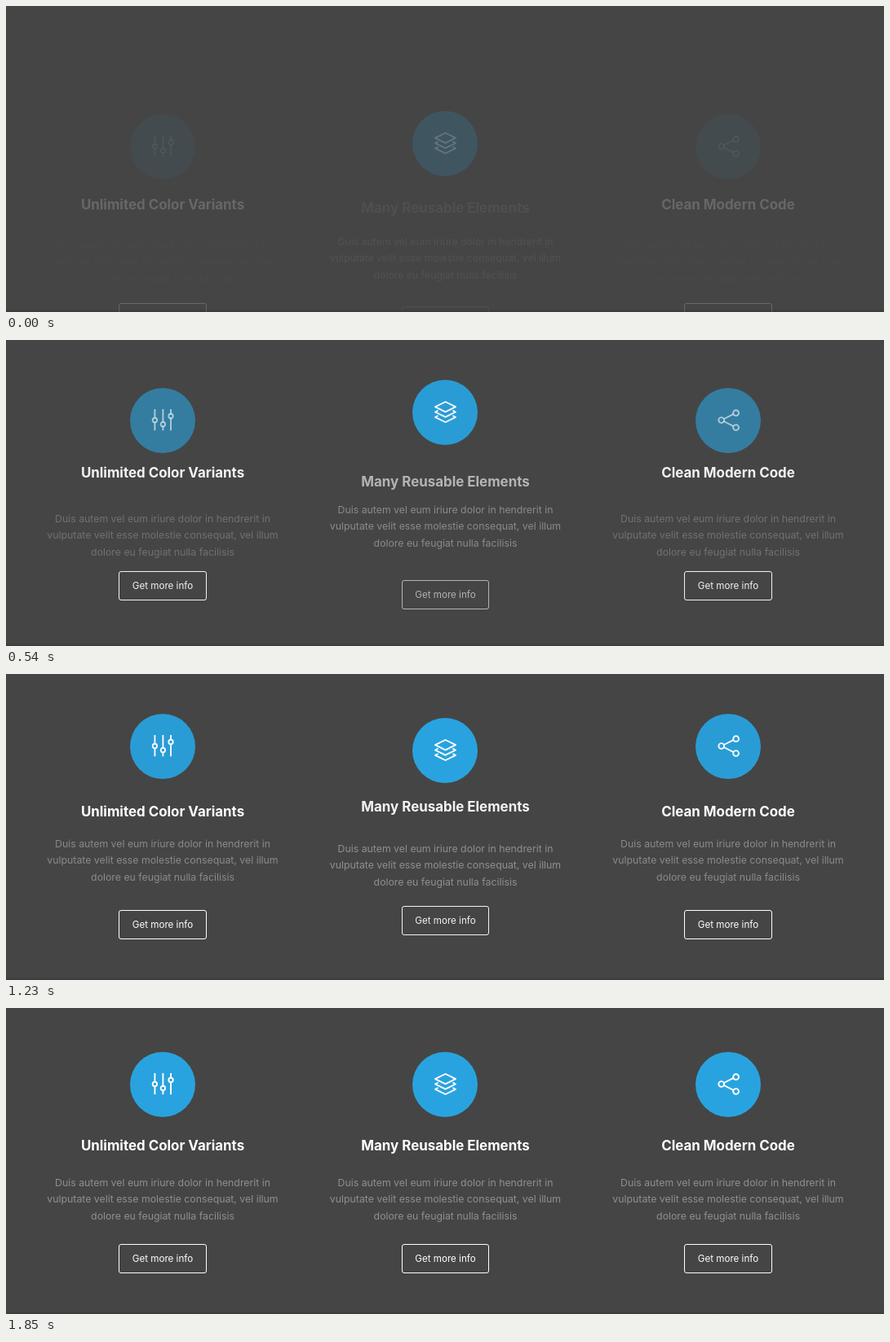
An HTML page with a canvas that plays this animation: 1076 by 376 pixels, repeating every 2160 ms.

```html
<!DOCTYPE html>
<html lang="en">
<head>
<meta charset="utf-8">
<title>Feature columns</title>
<style>
  html, body { margin: 0; width: 100%; height: 100%; overflow: hidden; background: #454545; }
  canvas { display: block; }
</style>
</head>
<body>
<canvas id="stage" width="1076" height="376"></canvas>
<script>
const ctx = document.getElementById('stage').getContext('2d');
const W = 1076, H = 376;
const LOOP = 2160, STEP = 77, LAST_STEP = 24, LEAD = 150;
const BLUE = '#29a3df', WHITE = '#fff', GREY = '#8f8f8f';

const FAST = { duration: 1000, from: 133.2, peak: -8.8 };
const SLOW = { duration: 2000, from: 92.4, peak: -8.7 };

const BODY = [
  'Duis autem vel eum iriure dolor in hendrerit in',
  'vulputate velit esse molestie consequat, vel illum',
  'dolore eu feugiat nulla facilisis'
];
const BODY_Y = [219, 239, 260];

const COLUMNS = [
  { x: 192, title: 'Unlimited Color Variants', icon: sliders, lead: FAST, follow: SLOW },
  { x: 538.5, title: 'Many Reusable Elements', icon: layers, lead: SLOW, follow: FAST },
  { x: 885, title: 'Clean Modern Code', icon: share, lead: FAST, follow: SLOW }
];

// cubic-bezier(.25, .1, .25, 1)
function ease(x) {
  if (x <= 0) return 0;
  if (x >= 1) return 1;
  let lo = 0, hi = 1;
  for (let i = 0; i < 24; i++) {
    const u = (lo + hi) / 2;
    if (0.75 * u * (1 - u) + u ** 3 < x) lo = u; else hi = u;
  }
  const v = 1 - lo;
  return 0.3 * lo * v * v + 3 * lo * lo * v + lo ** 3;
}

// Rise past the resting place until 60 %, then settle
function pose(group, time) {
  const p = Math.min(1, (time + LEAD) / group.duration);
  const { from, peak } = group;
  const y = p < 0.6
    ? from + (peak - from) * ease(p / 0.6)
    : peak * (1 - ease((p - 0.6) / 0.4));
  return { y, alpha: ease(p) };
}

// Whole-pixel placement; fraction is the subpixel part of the resting place
function place({ y, alpha }, fraction, draw) {
  ctx.save();
  ctx.globalAlpha = alpha;
  ctx.translate(0, Math.round(y + fraction));
  draw();
  ctx.restore();
}

function line(...pts) {
  ctx.beginPath();
  for (let i = 0; i < pts.length; i += 2) ctx.lineTo(pts[i], pts[i + 1]);
  ctx.stroke();
}

function ring(x, y, r) {
  ctx.beginPath();
  ctx.arc(x, y, r, 0, Math.PI * 2);
  ctx.stroke();
}

// Icons are drawn around the middle of their disc
function sliders() {
  for (const [x, y] of [[-9.6, -0.6], [0.4, 4.4], [10, -5.5]]) {
    line(x, -14, x, y - 2.8);
    ring(x, y, 2.7);
    line(x, y + 2.8, x, 12.2);
  }
}

function layers() {
  line(0.5, -13, 13, -6.8, 0.5, -0.6, -12, -6.8, 0.5, -13, 13, -6.8);
  for (const y of [-0.5, 5.8]) {
    line(-8.4, y - 1.8, -12, y, 0.5, y + 6.2, 13, y, 9.4, y - 1.8);
  }
}

function share() {
  line(-5.2, -2, 6.4, -7.8);
  line(-5.2, 1, 6.4, 6.9);
  ring(-8.3, -0.5, 3.4);
  ring(9.6, -9.3, 3.4);
  ring(9.6, 8.5, 3.4);
}

function text(str, x, y, font, color) {
  ctx.font = font + ' Inter, "Open Sans", sans-serif';
  ctx.fillStyle = color;
  ctx.fillText(str, x, y);
}

function disc(x, icon) {
  ctx.fillStyle = BLUE;
  ctx.beginPath();
  ctx.arc(x, 94, 40, 0, Math.PI * 2);
  ctx.fill();
  ctx.translate(x, 94);
  ctx.strokeStyle = WHITE;
  ctx.lineWidth = 1.9;
  ctx.lineJoin = 'round';
  icon();
}

function button(x) {
  const left = Math.floor(x - 53.5) + 0.5;
  ctx.strokeStyle = WHITE;
  ctx.lineWidth = 1;
  ctx.beginPath();
  ctx.roundRect(left, 290.5, x % 1 ? 106 : 107, 35, 2.5);
  ctx.stroke();
  text('Get more info', x, 312, '400 11.6px', WHITE);
}

function column({ x, title, icon, lead, follow }, time) {
  const a = pose(lead, time), b = pose(follow, time);
  place(b, 0.3, () => disc(Math.floor(x), icon));
  place(a, 0, () => text(title, x, 175, '700 16.9px', WHITE));
  place(b, 0, () => BODY.forEach((s, i) => text(s, x, BODY_Y[i], '400 12.3px', GREY)));
  place(a, 0.1, () => button(x));
}

function render(now) {
  const t = now % LOOP;
  const step = Math.min(LAST_STEP, Math.floor((t + 5) / STEP));
  ctx.fillStyle = '#454545';
  ctx.fillRect(0, 0, W, H);
  ctx.textAlign = 'center';
  for (const c of COLUMNS) column(c, step * STEP);
  const shade = ctx.createLinearGradient(0, H - 4, 0, H);
  shade.addColorStop(0, 'rgba(0,0,0,0)');
  shade.addColorStop(1, 'rgba(0,0,0,.14)');
  ctx.fillStyle = shade;
  ctx.fillRect(0, H - 4, W, 4);
}

const start = performance.now();
function tick() {
  render(performance.now() - start);
  requestAnimationFrame(tick);
}
tick();
</script>
</body>
</html>
```
